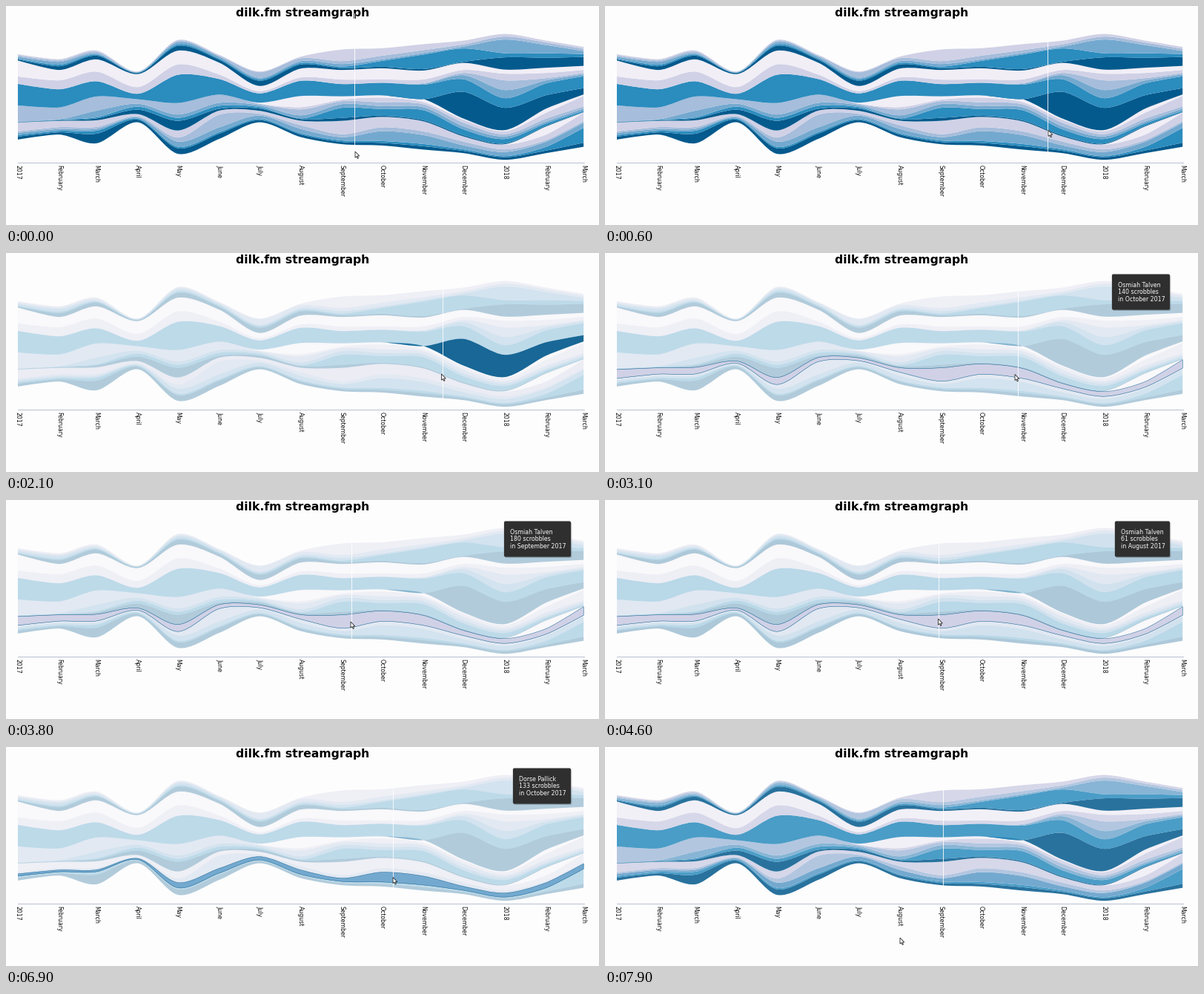
Recreate the animation shown at these times as a matplotlib script. Size 800 by 295 pixels, loop 8000 ms.

```python
import numpy as np
import matplotlib.pyplot as plt
from matplotlib.animation import FuncAnimation
from matplotlib.patches import FancyBboxPatch, PathPatch, Polygon
from matplotlib.path import Path
from matplotlib.textpath import TextPath

W, H, DPI = 800, 295, 100
FRAMES, STEP = 80, 100
PX = 72 / DPI  # points per pixel
COLORS = ["#045a8d", "#2b8cbe", "#74a9cf", "#a6bddb", "#d0d1e6", "#f1eef6"]
MONTHS = ["January", "February", "March", "April", "May", "June", "July", "August",
          "September", "October", "November", "December"]
DAYS = [31, 28, 31, 30, 31, 30, 31, 31, 30, 31, 30, 31, 31, 28]
X = 16 + 1.8 * np.concatenate([[0], np.cumsum(DAYS)])
N = len(X)
MIDDLE, SCALE = 122.4, 0.1
DIM, FADE = 0.3, 250

counts = []


def layer(*values):
    """Add one artist on top of the stack; missing early months are zero."""
    counts.append([0] * (N - len(values)) + list(values))


layer(40, 30, 130, 35, 75, 70, 30, 35, 30, 35, 45, 30, 35, 35, 55)
layer(20, 20, 40, 15, 20, 20, 15, 15, 20, 25, 30, 20, 15, 50, 200)
layer(30, 25, 25, 15, 70, 65, 45, 60, 45, 133, 120, 55, 55, 70, 70)
layer(20, 25, 25, 15, 55, 170, 25, 50, 40, 52, 50, 50, 35, 20, 20)
layer(120, 85, 90, 30, 95, 55, 40, 61, 180, 140, 135, 70, 65, 75, 115)
layer(5, 110, 5)
layer(5, 7, 25, 60, 130, 25, 30, 22, 40, 15, 15, 15, 10, 10, 5)
layer(5, 8, 15, 40, 40, 40, 20, 10, 135, 90, 135, 80, 60, 30, 15)
layer(5, 90, 40, 45, 40, 25, 40, 50, 40, 40, 40, 35, 25, 30)
layer(220, 160, 190, 60, 155, 110, 20, 80, 40, 50, 40, 50, 30, 40, 30)
layer(30, 20, 65, 30, 40, 40, 80, 140)
layer(15, 150, 45, 30, 40, 15, 15, 55, 20)
layer(360, 300, 180, 85)
layer(290, 245, 205, 75, 380, 210, 125, 205, 165, 170, 195, 170, 130, 160, 160)
layer(10, 55, 110, 40, 25)
layer(10, 30, 130, 30, 20)
layer(100, 120, 130, 90, 140, 60, 30, 45, 60, 45, 50, 40, 90, 70, 40)
layer(215, 140, 165, 175, 185, 160, 70, 120, 130, 150, 120, 95, 55, 70, 55)
layer(15, 50, 50, 15, 65, 40, 70, 55, 25, 20, 20, 15, 165, 135, 120)
layer(10, 20, 15, 5, 20, 15, 20, 20, 20, 80, 195, 180, 55, 60, 40)
layer(25, 40, 15, 7, 30, 25, 20, 25, 35, 20, 20, 25, 185, 110, 40)
layer(20, 20, 25, 5, 20, 15, 75, 40, 40, 50, 40, 30, 40, 35, 30)
layer(15, 15, 15, 3, 10, 10, 10, 20, 155, 100, 80, 50, 35, 25, 25)

DORSE, OSMIAH, DRELLING = 2, 4, 12
NAMES = {DORSE: "Dorse Pallick", OSMIAH: "Osmiah Talven", DRELLING: "DRELLINGMOOR"}

# (ms, hovered layer)
HOVERS = [(632, DRELLING), (2024, OSMIAH), (4180, None), (4400, OSMIAH),
          (5600, DORSE), (7744, None)]

# ms, pointer x, pointer y, guide line x
TRACK = np.array([
    (0, 471, 196, 469.5), (300, 515, 234, 514), (500, 590, 212, 589),
    (650, 602, 145, 601), (800, 606, 130, 604), (900, 608, 128, 606),
    (1500, 640, 132, 638), (1800, 640, 132, 638), (2100, 587.5, 163, 589),
    (2600, 575, 165, 577), (2900, 575, 165, 577), (3100, 553, 163.5, 556.5),
    (3700, 468, 164, 469), (3800, 465, 164, 466), (4100, 465, 164, 466),
    (4300, 460, 214, 460), (4600, 449.5, 160, 449.5), (5500, 449.5, 160, 449.5),
    (5700, 453, 177, 453), (6300, 490, 175, 490), (6900, 522, 175.5, 521.5),
    (7500, 522, 175.5, 521.5), (7750, 460, 190, 455.5), (7900, 398, 257, 455.5)])


def cardinal(y):
    """Bezier vertices of a cardinal spline (tension 0.7) with quadratic ends."""
    p = np.column_stack([X, y])
    m = 0.15 * (p[2:] - p[:-2])
    c1, c2 = p[:-1].copy(), p[1:].copy()
    c1[1:] += m
    c2[:-1] -= m
    head, tail = p[1] - m[0] * 2 / 3, p[-2] + m[-1] * 2 / 3
    c1[0] += (head - p[0]) * 2 / 3
    c2[0] = p[1] - m[0] * 4 / 9
    c1[-1] = p[-2] + m[-1] * 4 / 9
    c2[-1] += (tail - p[-1]) * 2 / 3
    return np.vstack([p[:1], np.stack([c1, c2, p[1:]], 1).reshape(-1, 2)])


def area(low, high):
    verts = np.vstack([cardinal(high), cardinal(low)[::-1]])
    curve = [Path.CURVE4] * (3 * (N - 1))
    return Path(verts, [Path.MOVETO] + curve + [Path.LINETO] + curve)


def ease(u):
    u = min(max(u, 0), 1)
    return 4 * u ** 3 if u < 0.5 else 1 - 4 * (1 - u) ** 3


def hover_state(t):
    """Layer opacities, hovered layer and time since the last change."""
    start = goal = np.ones(len(counts))
    since, hot = -1000, None
    for when, target in HOVERS:
        if when > t:
            break
        start = start + (goal - start) * ease((when - since) / FADE)
        goal = np.full(len(counts), 1.0 if target is None else DIM)
        if target is not None:
            goal[target] = 1
        since, hot = when, target
    return start + (goal - start) * ease((t - since) / FADE), hot, t - since


def text_width(s, size):
    return TextPath((0, 0), s, size=size).get_extents().width


plt.rcParams["font.family"] = "DejaVu Sans"
fig = plt.figure(figsize=(W / DPI, H / DPI), dpi=DPI, facecolor="#fdfdfd")
ax = fig.add_axes([0, 0, 1, 1])
ax.set(xlim=(0, W), ylim=(H, 0))
ax.axis("off")

ax.text(400, 14.3, "dilk.fm streamgraph", size=15.6 * PX, weight="bold", ha="center")

data = np.array(counts) * SCALE
bottom = MIDDLE + data.sum(0) / 2
edges = bottom - np.vstack([np.zeros(N), np.cumsum(data, 0)])
bands = []
for i in range(len(counts)):
    band = PathPatch(area(edges[i], edges[i + 1]), fc=COLORS[i % len(COLORS)],
                     ec=COLORS[0], lw=0, zorder=2)
    bands.append(ax.add_patch(band))

ax.plot([16, 780], [210.5, 210.5], color="#b9c0d0", lw=PX, zorder=3)
for i, x in enumerate(X):
    label = str(2017 + i // 12) if i % 12 == 0 else MONTHS[i % 12]
    ax.text(x - 2.7, 214.5, label, size=7.8 * PX, rotation=-90, color="#111111",
            rotation_mode="anchor", ha="left", va="baseline")

guide, = ax.plot([], [], color="white", lw=PX, alpha=0.85, zorder=4)

TIP_SIZE, TIP_RIGHT, TIP_TOP, TIP_HEIGHT = 7.85, 762, 28.5, 48


def tip_box(dx, dy, **style):
    box = FancyBboxPatch((600 + dx, TIP_TOP + dy), 100, TIP_HEIGHT,
                         boxstyle="round,pad=0,rounding_size=2", lw=0, **style)
    return ax.add_patch(box), dx


boxes = [tip_box(1.5, 1.5, fc="black", alpha=0.12, zorder=5),
         tip_box(0.7, 0.8, fc="black", alpha=0.2, zorder=5),
         tip_box(0, 0, fc="#2f2f2f", zorder=6)]
lines = [ax.text(0, 46 + 9.3 * k, "", size=TIP_SIZE * PX, color="#f4f4f4", zorder=7)
         for k in range(3)]

ARROW = np.array([(0, 0), (0, 8.2), (1.9, 6.5), (3.2, 9.5), (4.5, 8.9), (3.2, 6.1), (5.8, 6)])
pointer = ax.add_patch(Polygon(ARROW, fc="white", ec="#222222", lw=0.8 * PX, zorder=9))


def show_tip(hot, x):
    month = int(np.clip(np.searchsorted(X, x, side="right") - 1, 0, N - 1))
    rows = [NAMES[hot], f"{counts[hot][month]} scrobbles",
            f"in {MONTHS[month % 12]} {2017 + month // 12}"]
    width = max(text_width(s, TIP_SIZE) for s in rows) + 16
    for box, dx in boxes:
        box.set_x(TIP_RIGHT - width + dx)
        box.set_width(width)
    for line, s in zip(lines, rows):
        line.set_text(s)
        line.set_x(TIP_RIGHT - width + 8)


def update(frame):
    t = frame * STEP
    px, py, gx = (np.interp(t, TRACK[:, 0], TRACK[:, k]) for k in (1, 2, 3))
    alphas, hot, age = hover_state(t)
    tip_on = hot is not None and age > 100
    for i, band in enumerate(bands):
        band.set_alpha(alphas[i])
        band.set_linewidth(0.5 * PX if tip_on and i == hot else 0)
    guide.set_data([gx, gx], [10, 210])
    pointer.set_xy(ARROW + (px, py))
    for part in [box for box, _ in boxes] + lines:
        part.set_visible(tip_on)
    if tip_on:
        show_tip(hot, gx)
    return []


anim = FuncAnimation(fig, update, frames=FRAMES, interval=STEP, repeat=True,
                     repeat_delay=0, cache_frame_data=False)
plt.show()
```
